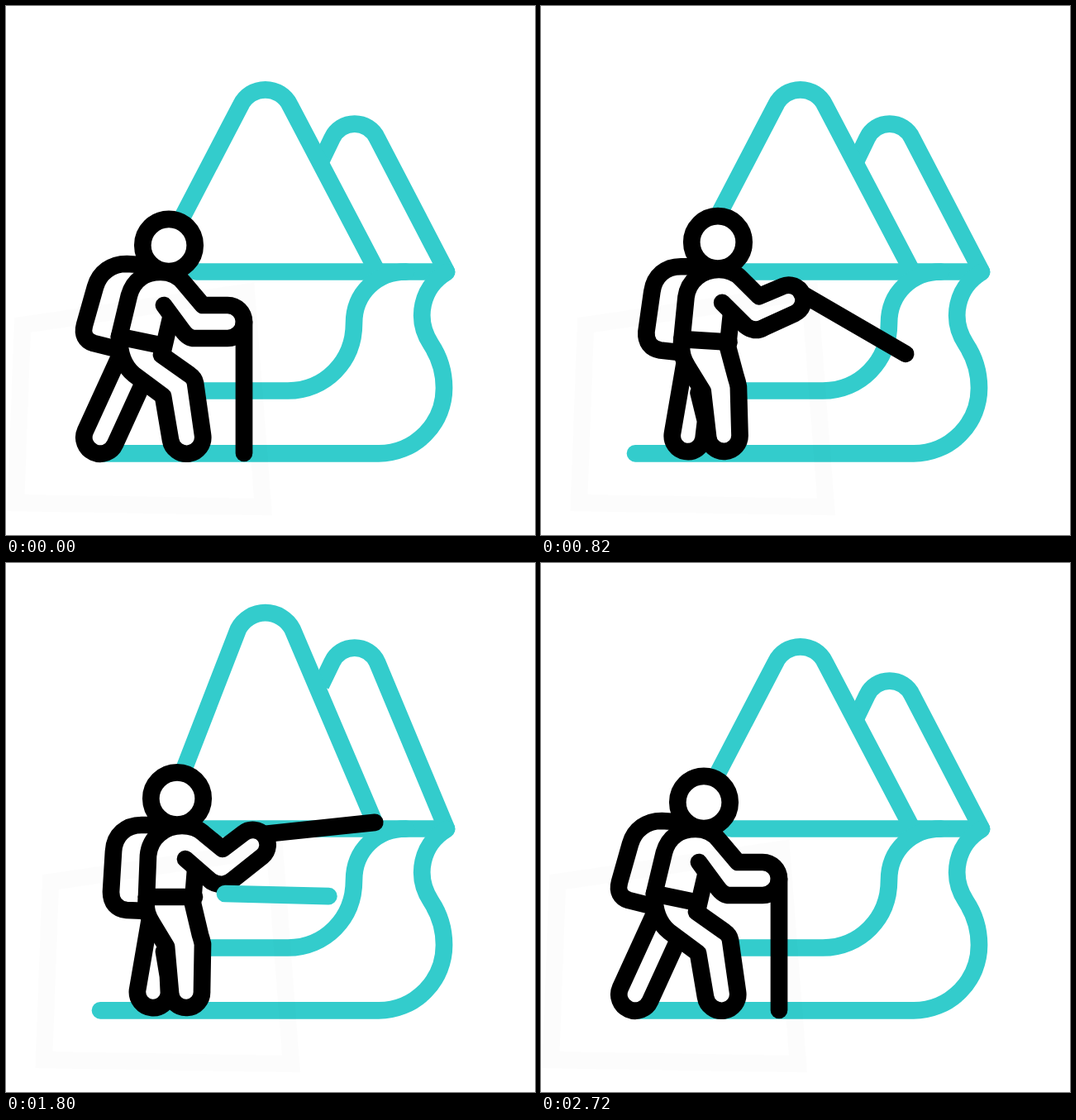
Animation of 640 by 640 pixels, one loop 3.6 s. Source, as an HTML page:

```html
<!DOCTYPE html>
<html lang="en">
<head>
<meta charset="utf-8">
<title>Hiker</title>
<style>
html, body { margin: 0; height: 100%; overflow: hidden; background: #fff; }
svg { display: block; width: 100vw; height: 100vh; }
path, circle { stroke-width: 20.7; stroke-linecap: round; stroke-linejoin: round; }
.land path { fill: none; stroke: #3cc; }
.man path, circle { fill: #fff; stroke: #000; }
#small { stroke-linecap: butt; }
#haze { fill: none; stroke: #000; stroke-opacity: .013; stroke-linejoin: miter; }
</style>
</head>
<body>
<svg viewBox="0 0 640 640">
  <g class="land">
    <path id="small"/>
    <path id="big"/>
    <path d="M230 321.5H533"/>
    <path d="M484 321.5C449 321.5 421 347 421 384C421 430 386 465.5 341 465.5H240"/>
    <path d="M533 322C503 340 494 378 514 409C524 424 530 442 530 462A79 79 0 0 1 451 541.3H114"/>
  </g>
  <g class="man" id="man"></g>
  <path id="haze"/>
  <g class="land" id="streaks"></g>
</svg>
<script>
const LOOP = 3600;
const $ = id => document.getElementById(id);
const mix = (a, b, p) => a + (b - a) * p;
const ramp = (t, from, to) => Math.min(1, Math.max(0, (t - from) / (to - from)));
const ease = (t, from, to) => { const x = ramp(t, from, to); return x * x * (3 - 2 * x); };

// Each part has three poses: leaning, stepping, upright.
const parts = {
  pack: [
    'M162 313L146 312C128 312 113 322 108 340L95 386C92 397 96 405 106 408L130 414',
    'M188 313L176 313C158 313 145 323 140 341L128 389C126 401 131 409 142 412L168 417',
    'M176 317L164 317C145 317 131 329 130 349L127 398C127 411 134 419 146 420L170 421'],
  backLeg: [
    'M139 420L96 514A1 1 0 0 0 132 530L148 495L164 460',
    'M174 430L159 517A1 1 0 0 0 196 526L203 505L190 465',
    'M174 430L159 517A1 1 0 0 0 197 521L196 500L191 470'],
  frontLeg: [
    'M137 400C137 425 145 438 155 446L190 472L199 525A1 1 0 0 0 238 519L229 456Q228 450 222 446L188 422',
    'M171 402C169 420 173 429 178 437L198 469L206 522A1 1 0 0 0 245 519L240 460Q239 454 237 448L226 413',
    'M170 404C168 420 172 428 177 436L194 464L199 520A1 1 0 0 0 237 518L238 461Q237 456 235 450L226 412'],
  torso: [
    'M137 400L149 350C154 332 168 322 187 322C200 322 210 328 216 336L238 362L268 362A1 1 0 0 1 268 402L228 402Q220 402 213 392L191 362',
    'M171 402L180 350C184 332 199 320 218 320C230 320 239 325 245 332L266 358L299 355A1 1 0 0 1 303 394L264 397Q253 398 247 390L222 360',
    'M170 404L172 354C174 332 192 318 213 318C226 318 234 322 240 328L262 346L287 327A1 1 0 0 1 310 355L276 382Q263 394 248 385L217 358'],
  belt: ['M137 400L190 411', 'M171 402L227 410', 'M170 404L228 404'],
  front: ['M199 378L189 421', 'M231 377L226 413', 'M229 372L226 410'],
  haze: [
    'M20 386L291 346L311 606L12 601Z',
    'M54 386L325 346L345 606L46 601Z',
    'M54 386L325 346L345 606L46 601Z']
};
const head = [[197, 289.5], [223, 287], [207, 285]];
const grip = [[288, 382], [320, 374], [312, 328]];
const angleKeys = [[300, 90], [560, 85.4], [1100, -31], [1360, -48], [1800, -6], [2340, 90]];
const lengthKeys = [[300, 159], [560, 160], [1100, 129], [1360, 139], [1800, 135], [2200, 139], [2420, 159]];

// Lines that grow from their start, then shrink towards their end.
const streaks = [
  { from: [513, 406], to: [265, 400], grow: [1178, 1612], shrink: [1605, 2000] },
  { from: [547, 488], to: [360, 484], grow: [1880, 2314], shrink: [2240, 2720], late: true },
  { from: [400, 78], to: [392, 50], grow: [1340, 1560], shrink: [1440, 1700] },
  { from: [440, 95], to: [467, 46], grow: [1270, 1560], shrink: [1360, 1700] },
  { from: [479, 118], to: [525, 93], grow: [1340, 1560], shrink: [1440, 1700] }
];

function addShape(parent, tag) {
  const el = document.createElementNS('http://www.w3.org/2000/svg', tag);
  parent.append(el);
  return el;
}

const shapes = {};
for (const name in parts) shapes[name] = name === 'haze' ? $('haze') : addShape($('man'), 'path');
const stick = addShape($('man'), 'path');
const face = addShape($('man'), 'circle');
face.setAttribute('r', 31.7);
for (const s of streaks) s.el = addShape($('streaks'), 'path');

const draw = (el, d) => el.setAttribute('d', d);
const mixPoint = (a, b, p) => a.map((v, i) => mix(v, b[i], p));

function mixPath(a, b, p) {
  const ends = b.match(/[\d.]+/g);
  let i = 0;
  return a.replace(/[\d.]+/g, v => mix(+v, +ends[i++], p));
}

function keyed(keys, t) {
  let value = keys[0][1];
  for (let i = 1; i < keys.length; i++)
    value = mix(value, keys[i][1], ease(t, keys[i - 1][0], keys[i][0]));
  return value;
}

function pose(t) {
  if (t < 560) return [0, 1, ease(t, 300, 560)];
  if (t < 1900) return [1, 2, ease(t, 560, 1040)];
  return [2, 0, ease(t, 1900, 2370)];
}

function drawMan(t) {
  const [a, b, p] = pose(t);
  for (const name in parts) draw(shapes[name], mixPath(parts[name][a], parts[name][b], p));
  const [cx, cy] = mixPoint(head[a], head[b], p);
  face.setAttribute('cx', cx);
  face.setAttribute('cy', cy);
  const [x, y] = mixPoint(grip[a], grip[b], p);
  const angle = keyed(angleKeys, t) * Math.PI / 180;
  const length = keyed(lengthKeys, t);
  draw(stick, `M${x} ${y}l${length * Math.cos(angle)} ${length * Math.sin(angle)}`);
}

function drawPeaks(t) {
  const p = ease(t, 1050, 1550) - ease(t, 1900, 2380);
  const y = 120 - 40 * p, r = 33 + 4 * p;
  draw($('big'), `M212 258L${284 - 3 * p} ${y}A${r} ${r} 0 0 1 ${343.5 + 3 * p} ${y}L449 321`);
  draw($('small'), `M381 ${188 - 40 * p}L394.5 ${y + 40}A30 30 0 0 1 449 ${y + 40}L533 321.5`);
}

function drawStreak(s, t) {
  const grown = ease(t, ...s.grow);
  const gone = s.late ? 1 - (1 - ramp(t, ...s.shrink)) ** 1.7 : ease(t, ...s.shrink);
  const visible = grown > 0 && gone < 1;
  draw(s.el, visible ? `M${mixPoint(s.from, s.to, gone)}L${mixPoint(s.from, s.to, grown)}` : '');
}

function frame() {
  const t = performance.now() % LOOP;
  drawPeaks(t);
  drawMan(t);
  for (const s of streaks) drawStreak(s, t);
  requestAnimationFrame(frame);
}
frame();
</script>
</body>
</html>
```
